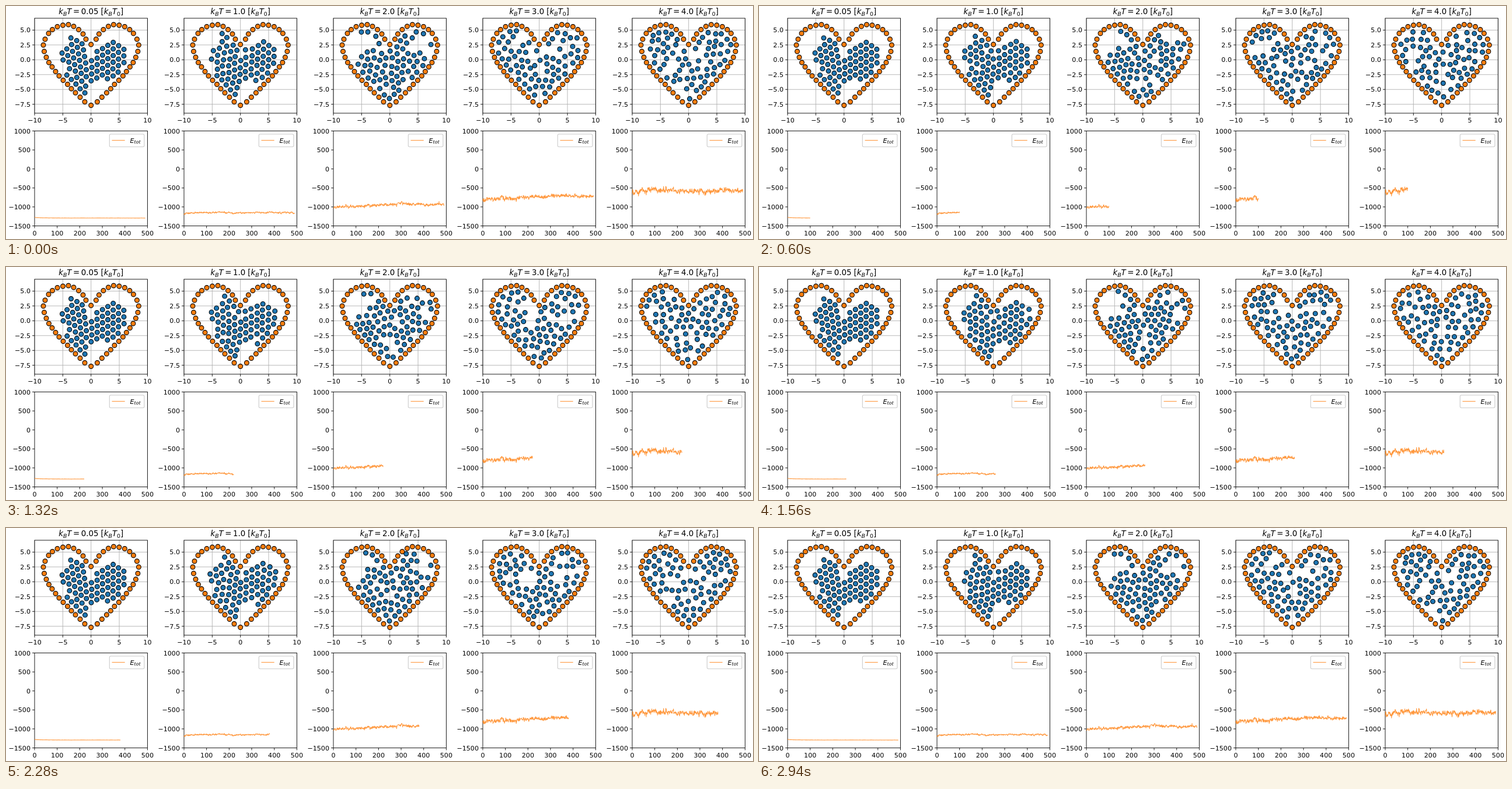
Animation of 1280 by 400 pixels, one loop 3000 ms. Source, as an HTML page with a canvas:

```html
<!DOCTYPE html>
<html lang="en">
<head>
<meta charset="utf-8">
<title>Heart particles</title>
<style>
html, body { margin: 0; width: 100%; height: 100%; overflow: hidden; background: #fff; }
canvas { display: block; }
</style>
</head>
<body>
<canvas id="stage" width="1280" height="400"></canvas>
<script>
const W = 1280, H = 400, FRAMES = 50, STEP = 60;
const PITCH = 256, LEFT = 49, RIGHT = 242.4, MID = 145.7;
const TOP = { y0: 21, y1: 184 }, LOW = { y0: 214.5, y1: 377.5 };
const SX = (RIGHT - LEFT) / 20, SY = (TOP.y1 - TOP.y0) / 16, ZERO = TOP.y0 + 7 * SY;
const BLUE = '#1f77b4', ORANGE = '#ff7f0e', LINE = 'rgba(255,127,14,0.8)';

// temperature, pull towards the lattice site, energy trend and its noise
const PANELS = [
  { label: '0.05', T: 0.05, pull: 60, noise: 1.2, trend: [-1288, -1291, -1292, -1292, -1293, -1294] },
  { label: '1.0', T: 1, pull: 10, noise: 13, trend: [-1162, -1142, -1150, -1154, -1145, -1164] },
  { label: '2.0', T: 2, pull: 0.5, noise: 24, trend: [-1012, -982, -950, -925, -932, -912] },
  { label: '3.0', T: 3, pull: 0.15, noise: 32, trend: [-820, -772, -755, -712, -718, -705] },
  { label: '4.0', T: 4, pull: 0, noise: 44, trend: [-590, -560, -560, -600, -582, -570] }
];

// left half of the heart outline, mirrored below
const HALF = [
  [135, 164.5], [127, 156.5], [119, 149], [112, 142], [105.5, 134.5], [98, 127.5],
  [91, 120], [85, 112.5], [79, 104.5], [73.5, 97], [69, 88], [65.5, 78], [64, 67],
  [67, 57], [73, 47], [79.5, 40.5], [88, 35.5], [97.5, 33], [107, 32], [116, 35],
  [124.5, 40.5], [132, 48], [137, 57]
];
const WALL = [[MID, 66], [MID, 170.5]];
for (const [x, y] of HALF) WALL.push([x, y], [2 * MID - x, y]);

// columns of the two crystal grains: x, y, count, lean
const COLUMNS = [
  [98, 78, 1, 0], [101, 95, 1, 0], [104.5, 73, 4, 1.6], [106, 123, 1, 0], [113.5, 128.5, 1, 0],
  [111, 55, 9, 1.6], [121, 59, 9, 1.6], [131, 63, 6, 1.6],
  [148, 93.5, 4, 0], [157, 78, 5, 0], [165.5, 73, 5, 0], [174, 68.5, 6, 0],
  [183, 63.5, 6, 0], [191.5, 68.5, 5, 0], [200, 74.5, 3, 0]
];
const SITES = [];
for (const [x, y, n, lean] of COLUMNS)
  for (let i = 0; i < n; i++) SITES.push([x + i * lean, y + i * 11.3]);

const toUnit = ([x, y]) => [(x - MID) / SX, (ZERO - y) / SY];

function random(seed) {
  return () => {
    seed = (seed + 0x6d2b79f5) | 0;
    let t = Math.imul(seed ^ (seed >>> 15), 1 | seed);
    t = (t + Math.imul(t ^ (t >>> 7), 61 | t)) ^ t;
    return ((t ^ (t >>> 14)) >>> 0) / 4294967296;
  };
}
function gaussian(seed) {
  const r = random(seed);
  return () => (r() + r() + r() - 1.5) * 2;
}

// Brownian motion of Lennard-Jones particles inside the heart
function simulate({ T, pull }, seed) {
  const g = gaussian(seed), dt = 0.0004, eps = 6, kick = Math.sqrt(2 * T * dt);
  const wall = WALL.map(toUnit), home = SITES.map(toUnit), n = home.length;
  const x = Float64Array.from(home, p => p[0]), y = Float64Array.from(home, p => p[1]);
  const fx = new Float64Array(n), fy = new Float64Array(n);

  const force = r2 => {
    const q = Math.max(r2, 0.8), s = 1 / (q * q * q);
    return 24 * eps * (2 * s * s - s) / q;
  };
  function move() {
    for (let i = 0; i < n; i++) {
      fx[i] = pull * (home[i][0] - x[i]);
      fy[i] = pull * (home[i][1] - y[i]);
    }
    for (let i = 0; i < n; i++) {
      for (let j = 0; j < i; j++) {
        const dx = x[i] - x[j], dy = y[i] - y[j], r2 = dx * dx + dy * dy;
        if (r2 > 6) continue;
        const f = force(r2);
        fx[i] += f * dx; fy[i] += f * dy;
        fx[j] -= f * dx; fy[j] -= f * dy;
      }
      for (const w of wall) {
        const dx = x[i] - w[0], dy = y[i] - w[1], r2 = dx * dx + dy * dy;
        if (r2 > 6) continue;
        const f = force(r2);
        fx[i] += f * dx; fy[i] += f * dy;
      }
    }
    for (let i = 0; i < n; i++) {
      x[i] += fx[i] * dt + kick * g();
      y[i] += fy[i] * dt + kick * g();
    }
  }

  const frames = [];
  for (let s = 0; s < 1200; s++) move();
  for (let k = 0; k < FRAMES; k++) {
    for (let s = 0; s < 55; s++) move();
    frames.push(Array.from(x, (v, i) => [MID + v * SX, ZERO - y[i] * SY]));
  }
  return frames;
}

function energy({ trend, noise, T }, seed) {
  const g = gaussian(seed), out = [];
  let slow = 0;
  for (let i = 0; i <= 490; i++) {
    const k = Math.min(4, Math.floor(i / 100)), u = (i - k * 100) / (k < 4 ? 100 : 90);
    slow = slow * 0.8 + g() * 0.6;
    const start = (T < 1 ? 14 : -20) * Math.exp(-i / 12);
    out.push(trend[k] + (trend[k + 1] - trend[k]) * u + start + noise * (slow * 0.7 + g() * 0.6));
  }
  return out;
}

const ctx = document.getElementById('stage').getContext('2d');
const back = document.createElement('canvas');
back.width = W;
back.height = H;

const font = (size, italic) => `${italic ? 'italic ' : ''}${size}px "DejaVu Sans", sans-serif`;

function stroke(c, x0, y0, x1, y1, color, width = 0.89) {
  c.strokeStyle = color;
  c.lineWidth = width;
  c.beginPath();
  c.moveTo(x0, y0);
  c.lineTo(x1, y1);
  c.stroke();
}

function dot(c, [x, y], color) {
  c.beginPath();
  c.arc(x, y, 3.9, 0, Math.PI * 2);
  c.fillStyle = color;
  c.fill();
  c.strokeStyle = '#000';
  c.lineWidth = 1.1;
  c.stroke();
}

// parts: [text, style]; i italic, s subscript, space before/after "="
function formula(c, parts, x, y, size, centred) {
  const setFont = s => { c.font = font(s.includes('s') ? size * 0.7 : size, s.includes('i')); };
  const width = ([t, s]) => { setFont(s); return c.measureText(t).width + (t === '=' ? size * 0.38 : 0); };
  c.textAlign = 'left';
  if (centred) x -= parts.reduce((sum, p) => sum + width(p), 0) / 2;
  for (const p of parts) {
    const w = width(p);
    c.fillText(p[0], x + (p[0] === '=' ? size * 0.19 : 0), y + (p[1].includes('s') ? size * 0.16 : 0));
    x += w;
  }
}

const minus = s => s.replace('-', '\u2212');

function axes(c, box, xs, ys, xAt, yAt, digits, grid) {
  if (grid) {
    for (const v of xs) stroke(c, xAt(v), box.y0, xAt(v), box.y1, '#b0b0b0');
    for (const v of ys) stroke(c, LEFT, yAt(v), RIGHT, yAt(v), '#b0b0b0');
  }
  c.font = font(11.11);
  c.fillStyle = '#000';
  c.textAlign = 'center';
  for (const v of xs) {
    stroke(c, xAt(v), box.y1, xAt(v), box.y1 + 3.9, '#000');
    c.fillText(minus(String(v)), xAt(v), box.y1 + 16.4);
  }
  c.textAlign = 'right';
  for (const v of ys) {
    stroke(c, LEFT, yAt(v), LEFT - 3.9, yAt(v), '#000');
    c.fillText(minus(v.toFixed(digits)), LEFT - 7, yAt(v) + 4.1);
  }
}

function frameBox(c, box) {
  c.strokeStyle = '#000';
  c.lineWidth = 0.89;
  c.strokeRect(LEFT, box.y0, RIGHT - LEFT, box.y1 - box.y0);
}

const stepX = v => LEFT + v / 500 * (RIGHT - LEFT);
const energyY = v => LOW.y0 + (1000 - v) / 2500 * (LOW.y1 - LOW.y0);

function drawStatic(c, label) {
  axes(c, TOP, [-10, -5, 0, 5, 10], [5, 2.5, 0, -2.5, -5, -7.5],
    v => MID + v * SX, v => ZERO - v * SY, 1, true);
  frameBox(c, TOP);
  const kT = [['k', 'i'], ['B', 'is'], ['T', 'i']];
  formula(c, [...kT, ['=', ''], [label, ''], [' [', ''], ...kT, ['0', 's'], [']', '']],
    MID, 14.4, 13.33, true);

  axes(c, LOW, [0, 100, 200, 300, 400, 500], [1000, 500, 0, -500, -1000, -1500], stepX, energyY, 0);
  frameBox(c, LOW);
  c.beginPath();
  c.roundRect(177.3, 220, 59.6, 21.7, 2.2);
  c.strokeStyle = '#ccc';
  c.lineWidth = 1.1;
  c.stroke();
  stroke(c, 181.5, 230.6, 203.7, 230.6, LINE, 1.1);
  formula(c, [['E', 'i'], ['tot', 'is']], 212.6, 234.5, 11.11);
}

function eachPanel(c, draw) {
  PANELS.forEach((p, i) => {
    c.save();
    c.translate(i * PITCH, 0);
    draw(p);
    c.restore();
  });
}

PANELS.forEach((p, i) => {
  p.frames = simulate(p, 11 + i);
  p.energy = energy(p, 71 + i);
});

const bc = back.getContext('2d');
bc.fillStyle = '#fff';
bc.fillRect(0, 0, W, H);
eachPanel(bc, p => drawStatic(bc, p.label));

function render(k) {
  ctx.drawImage(back, 0, 0);
  eachPanel(ctx, p => {
    for (const pos of p.frames[k]) dot(ctx, pos, BLUE);
    for (const pos of WALL) dot(ctx, pos, ORANGE);
    ctx.beginPath();
    for (let i = 0; i <= k * 10; i++) ctx.lineTo(stepX(i), energyY(p.energy[i]));
    ctx.strokeStyle = LINE;
    ctx.lineWidth = 1.1;
    ctx.lineJoin = 'round';
    ctx.stroke();
  });
}

const start = performance.now();
let shown = -1;
function tick() {
  // the loop opens on the finished run
  const k = Math.floor((performance.now() - start) / STEP) % FRAMES || FRAMES - 1;
  if (k !== shown) render(shown = k);
  requestAnimationFrame(tick);
}
tick();
</script>
</body>
</html>
```
